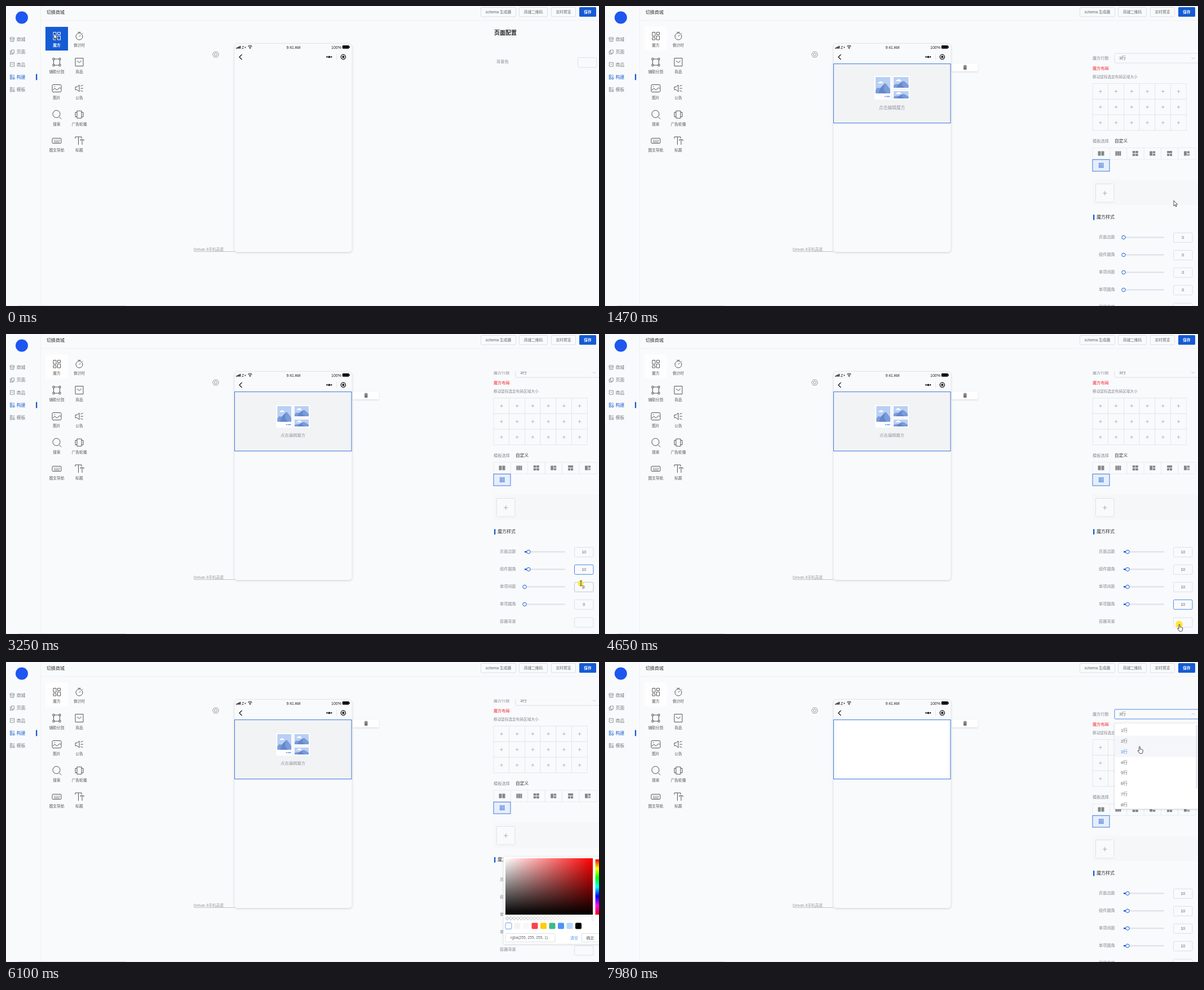
An HTML page that plays this animation: 1052x532 px, repeating every 8000 ms.

```html
<!DOCTYPE html>
<html>
<head>
<meta charset="utf-8">
<style>
html, body { margin: 0; width: 100%; height: 100%; overflow: hidden; background: #f9fafc; }
svg { display: block; width: 100vw; height: 100vh; }
text { font-family: "Liberation Sans", "Noto Sans CJK SC", "Noto Sans CJK", sans-serif; white-space: pre; }
</style>
</head>
<body>
<svg viewBox="0 0 1052 532" preserveAspectRatio="none">
  <defs>
    <clipPath id="scroller"><path d="M855 66.500H1052V532H855z"/></clipPath>
    <linearGradient id="sat"><stop stop-color="#fff"/><stop offset="1" stop-color="#f00"/></linearGradient>
    <linearGradient id="val" x2="0" y2="1"><stop stop-opacity="0"/><stop offset="1"/></linearGradient>
    <linearGradient id="hue" x2="0" y2="1" data-stops></linearGradient>
    <linearGradient id="alpha"><stop stop-color="#fff" stop-opacity="0"/><stop offset="1" stop-color="#fff"/></linearGradient>
    <pattern id="checker" width="6" height="6" patternUnits="userSpaceOnUse">
      <path d="M0 0h3v3H0zM3 3h3v3H3z" fill="#ccc"/>
    </pattern>
    <filter id="shadow" x="-20%" y="-20%" width="140%" height="140%">
      <feDropShadow dx="0" dy="1" stdDeviation="1.500" flood-opacity=".14"/>
    </filter>
  </defs>
  <g id="base"></g>
  <g id="live"></g>
</svg>
<script>
const LOOP = 8000, BLUE = '#155bd4', BG = '#f9fafc', LINE = '#dcdfe6', GREY = '#85888f', INK = '#606266';
const $ = id => document.getElementById(id);

// Drawing helpers; text is placed by its vertical centre.
const text = (x, y, s, size = 7.2, fill = GREY, anchor = 'start', more = '') =>
  `<text x="${x}" y="${y + size * .37}" font-size="${size}" fill="${fill}" text-anchor="${anchor}" ${more}>${s}</text>`;
const mid = (x, y, s, size, fill, more) => text(x, y, s, size, fill, 'middle', more);
const rect = (x, y, w, h, fill, stroke = 'none', r = 0, more = '') =>
  `<rect x="${x}" y="${y}" width="${w}" height="${h}" rx="${r}" fill="${fill}" stroke="${stroke}" ${more}/>`;
const path = (d, stroke = '#555', fill = 'none', width = 1, more = '') =>
  `<path d="${d}" stroke="${stroke}" fill="${fill}" stroke-width="${width}" ${more}/>`;
const circle = (x, y, r, fill, stroke = 'none', width = 1) =>
  `<circle cx="${x}" cy="${y}" r="${r}" fill="${fill}" stroke="${stroke}" stroke-width="${width}"/>`;
const group = (x, y, body, more = '') => `<g transform="translate(${x} ${y})" ${more}>${body}</g>`;
const range = n => [...Array(n).keys()];

const clamp = v => Math.max(0, Math.min(1, v));
const smooth = p => p * p * (3 - 2 * p);
const out = p => 1 - (1 - p) ** 3;
const ramp = (t, from, ms) => clamp((t - from) / ms);

// Eased position along [time, x, y] keys.
function along(keys, t) {
  let i = keys.findIndex(k => k[0] > t);
  if (i < 0) return keys[keys.length - 1].slice(1);
  if (i === 0) return keys[0].slice(1);
  const [a, b] = [keys[i - 1], keys[i]], p = smooth((t - a[0]) / (b[0] - a[0]));
  return [a[1] + (b[1] - a[1]) * p, a[2] + (b[2] - a[2]) * p];
}

const tiles = [
  ['魔方', 'M-6-6.500h5v7h-5zM-6 3h5v4h-5zM1.500-6.500h5v4h-5zM1.500 0h5v7h-5z'],
  ['倒计时', 'M-6 1a6 6 0 1 0 12 0a6 6 0 1 0-12 0M-2.500-6.500h5M0 1l2.500-2.500M5-5l1 1'],
  ['辅助分割', 'M-4-5.500H4M-4 5.500H4M-5.500-4V4M5.500-4V4M-7-7h3v3h-3zM4-7h3v3h-3zM-7 4h3v3h-3zM4 4h3v3h-3z'],
  ['商品', 'M-7-7H7V7H-7zM-3.500-2.500Q0 4 3.500-2.500'],
  ['图片', 'M-6-6.500H6q2 0 2 2v9q0 2-2 2H-6q-2 0-2-2v-9q0-2 2-2zM-7 3l4-3 3 3 5-4 2 1M-4.500-3h1.500'],
  ['公告', 'M-7-2.500h3l4-3.500v12l-4-3.500h-3zM2.500 0h4.500M2.500-4l4-1.500M2.500 4l4 1.500'],
  ['搜索', 'M-7-1a6.500 6.500 0 1 0 13 0a6.500 6.500 0 1 0-13 0M4 4l4 4'],
  ['广告轮播', 'M-4-6.500H4V6.500H-4zM-4-4H-7V4h3M4-4h3V4H4'],
  ['图文导航', 'M-6-4.500H6q2 0 2 1.500v6q0 1.500-2 1.500H-6q-2 0-2-1.500v-6q0-1.500 2-1.500zM-5-1h2M-2-1h2M1-1h2M4-1h2M-5 2h10'],
  ['标题', 'M-7-4v-3H4v3M-1.500-7V7M2 0v-2h6v2M5-2v9'],
];

function tile(i, x, y, active) {
  const [name, d] = tiles[i], ink = active ? '#fff' : '#555';
  return (active ? rect(-20, -16, 40, 42, BLUE) : '') && group(x, y, rect(-20, -16, 40, 42, BLUE) +
    path(d, ink) + mid(0, 17, name, 6.7, ink, 'font-weight="600"')) ||
    group(x, y, path(d, ink) + mid(0, 17, name, 6.7, '#555'));
}

function sidebar() {
  const gridIcon = 'M-3.500-3.500h3v3h-3zM-3.500 1h3v3h-3zM1.500-3h2.500M1.500-.5h2.500M1.500 1.500h2.500v2.500h-2.500z';
  const items = [
    ['商城', 'M-3.500-3.500h7l.5 2.500h-8zM-3-1v4.500h6v-4.500M-1 1.500h2'],
    ['页面', 'M-1.500-3.500h5v5.500h-5zM-1.500-1.500h-2v5.500h5v-2'],
    ['商品', 'M-3.500-3.500h7v7h-7zM-1.500-1q1.500 2.500 3 0'],
    ['构建', gridIcon], ['模板', gridIcon],
  ];
  return circle(28, 20.500, 11, '#1e56f0') + items.map(([name, d], i) => {
    const y = 59.300 + i * 22.150, ink = i === 3 ? BLUE : '#777a80';
    return group(11, y, path(d, ink, 'none', .8)) + text(18.700, y, name, 7.900, ink);
  }).join('') + rect(53, 120.500, 2.300, 11, BLUE, 'none', 1);
}

function header() {
  const button = (x, w, s) => rect(x + .5, 2.500, w - 1, 16.500, BG, LINE, 1.500) + mid(x + w / 2, 10.500, s, 6.700, INK);
  return text(72, 11, '切换商城', 8, '#333') + button(842, 63, 'schema 生成器') + button(910, 51, '商城二维码') +
    button(967, 44, '实时预览') + rect(1017, 2, 30, 17, BLUE, 'none', 1.500) +
    mid(1032, 10.500, '保存', 6.700, '#fff', 'font-weight="700"');
}

function phone() {
  return rect(405, 66.500, 209, 370, BG, '#e6e7ea', 6, 'filter="url(#shadow)"') +
    range(4).map(i => rect(408 + i * 2.200, 74 - i * 1.100, 1.600, 1.500 + i * 1.100, '#111')).join('') +
    text(418, 73, 'Z+', 7, '#222') +
    path('M429.500 71.500q3.500-3 7 0M431 73.300q2-1.600 4 0', '#111', 'none', 1.200) + circle(433, 75, .9, '#111') +
    mid(510, 73, '9:41 AM', 6.800, '#222') + text(577, 73, '100%', 7, '#222') +
    rect(597, 70, 11.500, 5.500, '#111', '#111', 1.200, 'stroke-width=".5"') + rect(609, 71.500, 1, 2.500, '#111') +
    path('M418.500 86l-4.500 4.500 4.500 4.500', '#111', 'none', 1.200) +
    circle(569.500, 90.300, 1.200, '#111') + circle(573.300, 90.300, 1.900, '#111') + circle(577.100, 90.300, 1.200, '#111') +
    path('M586.500 85v11', '#e4e5e8') + circle(598.300, 90.300, 4.100, 'none', '#111', 1.300) + circle(598.300, 90.300, 2, '#111') +
    group(372, 86, path('M-5.500 0l2.700-4.700h5.600l2.700 4.700-2.700 4.700h-5.600z', '#999') + circle(0, 0, 2.400, 'none', '#999')) +
    text(333, 431.700, 'Dolvan 8手机高度', 6.700, '#999') + path('M333 435.500H405', '#c4c5c8');
}

$('base').innerHTML = rect(0, 0, 1052, 532, BG) + path('M61.500 0V532M61.500 25.500H1052', '#f0f1f4') +
  path('M0 531.500H1052', '#eceded') + path('M22 531.500H212', '#d4d4d6') + sidebar() + header() + phone() +
  tiles.slice(1).map((_, i) => tile(i + 1, i % 2 ? 90 : 130, 53 + (i + 1 >> 1) * 46.500)).join('');
document.querySelector('[data-stops]').innerHTML =
  range(7).map(i => `<stop offset="${i / 6}" stop-color="hsl(${i * 60} 100% 50%)"/>`).join('');

// Placeholder pictures inside the dropped component.
function scene(x, y, w, h) {
  return rect(x - 2, y - 2, w + 4, h + 4, '#fff') + rect(x, y, w, h, '#b9cff4') + group(x, y,
    path(`M0 ${h * .8}Q${w * .15} ${h * .55} ${w * .3} ${h * .7}L${w * .62} ${h * .4}Q${w * .7} ${h * .35} ${w * .78} ${h * .48}L${w} ${h * .75}V${h}H0z`, 'none', '#7b9cda') +
    path(`M${w * .3} ${h * .7}L${w * .62} ${h * .4}L${w * .55} ${h * .75}L${w * .75} ${h}H${w * .2}z`, 'none', '#6588cb') +
    path(`M${w * .15} ${h * .38}q1-3 3.500-2.500q2-2.500 4 .5q2 0 2 2z`, 'none', '#fff'));
}

function component(t) {
  if (t < 780) return '';
  const white = t >= 6790, k = t >= 2720 ? .952 : 1;
  const art = rect(478, 124, 30, 42, '#fff') + scene(480, 126, 26, 29) + rect(496, 159.500, 2, 2, '#5b8be0', 'none', 1) +
    rect(499, 159.500, 6.500, 2, '#7ba4ee') + scene(512, 126, 26.500, 19) + scene(512, 151, 26.500, 13) +
    mid(509, 180.500, '点击编辑魔方', 7.750, '#96989d');
  return rect(405.500, 102.500, 207.500, 105, white ? BG : '#f2f3f5', t >= 1010 ? '#3f78dc' : 'none') +
    (white ? rect(411, 103.500, 197, 103, '#fff')
      : `<g transform="translate(509 165) scale(${k}) translate(-509 -165)">${art}</g>`) +
    rect(615.500, 102, 46, 14, '#fff', 'none', 1, 'filter="url(#shadow)"') +
    path('M635.500 106.500h6.500M637.500 106v-1h2.500v1', '#777') + rect(636, 107.300, 5.500, 5.700, '#777', 'none', .7);
}

// Number rows: caret set, digit typed, value committed.
const rows = [
  ['页面边距', 2110, 2260, 2720], ['组件圆角', 2720, 2870, 3230],
  ['单项间距', 3240, 3580, 3900], ['单项圆角', 3920, 4060, 4620],
];

function numberRow([name, focus, key, commit], i, t) {
  const y = 410.300 + i * 31, x = t >= commit ? 927 : 920;
  const lit = t >= focus + 110 && t < commit + 110, typing = t >= focus && t < commit;
  return text(876, y - .8, name) + rect(920, y - 1.200, 72, 2.400, '#e1e4ec', 'none', 1.200) +
    rect(920, y - 1.200, x - 920, 2.400, BLUE) + circle(x, y, 3.200, '#fff', BLUE) +
    rect(1008.500, y - 8, 33.500, 17, BG, lit ? '#4d86e6' : typing ? '#c0c4cc' : LINE, 2) +
    mid(1025.300, y + .5, t >= key ? '10' : '0', 7, INK) +
    (typing ? path(`M1023.500 ${y - 3}v7`, '#333', 'none', .6) : '');
}

const templates = [
  'M-5.500-4h5v8h-5zM.5-4h5v8h-5z',
  'M-5-4h3v8h-3zM-1.500-4h3v8h-3zM2-4h3v8h-3z',
  'M-5-4.500h4.600v4h-4.600zM.4-4.500h4.600v4h-4.600zM-5 .5h4.600v4h-4.600zM.4 .5h4.600v4h-4.600z',
  'M-5-4h5v8h-5zM.8-4h4.200v3.600h-4.200zM.8 .4h4.200v3.600h-4.200z',
  'M-4.500-4.500h9v4h-9zM-4.500 .5h4.100v4h-4.100zM.4 .5h4.100v4h-4.100z',
  'M-5-4h5v8h-5zM.8-4h4.200v3.600h-4.200zM.8 .4h1.700v3.600h-1.700zM3.300 .4h1.700v3.600h-1.700z',
];

function panel(t) {
  if (t < 1010) return mid(886, 47.500, '页面配置', 10, '#222', 'font-weight="600"') +
    text(870, 98.500, '背景色') + rect(1014.500, 91.500, 33, 17.500, BG, LINE, 2);
  const scroll = 24 * (smooth(ramp(t, 1700, 150)) - smooth(ramp(t, 7020, 150)));
  const open = t >= 7500;
  let s = text(865, 92.500, '魔方行数') + rect(904, 84, 160, 17, BG, open ? '#4d86e6' : LINE, 1.500) +
    text(912, 92.500, '3行', 7.700, INK) +
    path(open ? 'M1040.500 94l3-3 3 3' : 'M1040.500 91l3 3 3-3', '#b4b8c0', 'none', .8) +
    text(865, 110.300, '魔方布局', 7.200, '#f5222d') + text(865, 125.500, '移动鼠标选定布局区域大小', 6.650);
  for (let i = 0; i < 18; i++) {
    const x = 865 + i % 6 * 27.700, y = 137.500 + (i / 6 | 0) * 27.700;
    s += rect(x, y, 27.700, 27.700, BG, '#e1e3e8', 0, 'stroke-width=".8"') +
      path(`M${x + 11.300} ${y + 14}h5.400M${x + 14} ${y + 11.300}v5.400`, '#a5a7ac', 'none', .8);
  }
  s += text(865, 239, '模板选择') + text(904, 239, '自定义', 7.700, '#333');
  templates.forEach((d, i) => {
    s += rect(865 + i * 30.400, 251.300, 30.400, 20.700, BG, '#e6e8ed', 0, 'stroke-width=".8"') +
      group(880 + i * 30.400, 261.500, path(d, 'none', '#85878b'));
  });
  s += rect(865, 272.300, 30, 20.700, '#e6eefb', '#3f78dc') + range(16).map(i =>
    rect(876 + i % 4 * 2.300, 278.500 + (i >> 2) * 2.300, 1.500, 1.500, BLUE)).join('') +
    rect(865, 308.500, 187, 44.500, '#f6f7f9') +
    rect(870.500, 315.500, 32.500, 32.500, BG, '#c4c7ce', 2, 'stroke-dasharray="2 1.500" stroke-width=".8"') +
    path('M883 332h7.500M886.700 328.200v7.500', '#999', 'none', .8) +
    rect(866, 370, 2.300, 9.500, BLUE) + text(872, 374.500, '魔方样式', 8, '#333') +
    rows.map((r, i) => numberRow(r, i, t)).join('') +
    text(876, 533.500, '容器背景') + rect(1008.500, 527, 33.500, 17, BG, LINE, 2);
  return `<g clip-path="url(#scroller)">${group(0, -scroll, s)}</g>`;
}

function unfold(k, y, body) {
  return k < .01 ? '' : `<g opacity="${k}" transform="translate(0 ${y}) scale(1 ${k}) translate(0 ${-y})">${body}</g>`;
}

function picker(t) {
  const k = t < 6800 ? out(ramp(t, 4790, 200)) : (1 - ramp(t, 6800, 200)) ** 3, chosen = t >= 5710;
  const swatches = ['#fff', '#f3f3f3', '#f8f8f8', '#f5444c', '#ffcd00', '#3dba86', '#4e92fb', '#b6d8fd', '#000'];
  return unfold(k, 500, rect(882.500, 345, 180, 155, '#fff', '#eceef2', 2, 'filter="url(#shadow)"') +
    rect(886, 348, 155, 100, 'url(#sat)') + rect(886, 348, 155, 100, 'url(#val)') + rect(1045.500, 350, 8, 98, 'url(#hue)') +
    rect(886, 451.500, 155, 6.500, 'url(#checker)') + rect(886, 451.500, 155, 6.500, 'url(#alpha)') +
    rect(1039.500, 450.500, 2.500, 8, '#fff', '#ddd', .5, 'stroke-width=".7"') +
    swatches.map((c, i) => rect(886 + i * 15.500, 462.500, 11, 11, c, i || !chosen ? 'none' : '#6b9cf5', 2)).join('') +
    rect(886, 481.500, 88, 15, '#fff', LINE, 1.500) + (chosen ? text(895, 489, 'rgba(255, 255, 255, 1)', 6.700, INK) : '') +
    mid(1008, 489, '清空', 6.900, '#4e8df5') + rect(1021.500, 481.500, 40, 15, '#fff', LINE, 1.500) + mid(1036.500, 489, '确定', 6.900, INK));
}

function dropdown(t, cursorY) {
  return unfold(out(ramp(t, 7500, 250)), 108,
    rect(904, 108.500, 160, 152, '#fff', '#e6e8ed', 2, 'filter="url(#shadow)"') +
    path('M923 108.500l3.500-3.500 3.500 3.500', '#e6e8ed', '#fff') + range(8).map(i => {
      const y = 121.300 + i * 18.800;
      return (Math.abs(cursorY - y) < 9.500 ? rect(904.500, y - 9.400, 150, 18.800, '#f5f6f9') : '') +
        text(915, y, `${i + 1}行`, 7.700, i === 2 ? '#3f86f5' : INK);
    }).join('') + rect(1048, 111, 3, 114, '#e6e7ea', 'none', 1.500));
}

const cursorKeys = [
  [230, 85, 49], [780, 485, 149], [1240, 485, 149], [1470, 1009, 345], [1850, 1009, 345], [2020, 1021, 388],
  [2380, 1021, 388], [2530, 1021, 418], [3030, 1021, 418], [3200, 1020, 442], [3680, 1020, 442], [3850, 1020, 479],
  [4230, 1020, 479], [4480, 1019, 514.500], [4900, 1019, 514.500], [5190, 908, 470], [5250, 908, 470], [5560, 895, 467],
  [5780, 895, 467], [6050, 1062, 492], [6740, 1062, 492], [6880, 1017, 436], [7180, 1017, 436], [7430, 945, 92],
  [7650, 945, 92], [7960, 948.500, 149.500],
];
const clicks = [2110, 2720, 3240, 3920, 4620, 5710, 6750, 7500];
const arrow = 'M0 0v9.500l2.200-2 1.500 3.400 1.400-.6-1.500-3.300h3z';
const hand = 'M-.9 .8q.9-1.200 1.800 0v4l4 1q1 .4 .9 1.500l-.6 4q-.3 1.400-1.500 1.400h-3.500l-3.300-4.300q-.4-1.300 .9-1.200l1.300 1z';
const beam = 'M-1.700-4.300h3.400M0-4.300v8.600M-1.700 4.300h3.400';

function pointer(t, x, y) {
  const onHand = t > 4400 && t < 6100 || t > 7350;
  const onField = t > 1980 && t <= 4400;
  return group(x, y, (clicks.some(c => t >= c && t < c + 120) ? circle(-.5, .5, onField ? 5 : 6.500, '#ffe83a') : '') +
    (onField ? path(beam, '#333', 'none', .9) : path(onHand ? hand : arrow, '#222', '#fff', .8)));
}

function render(now) {
  const t = now % LOOP, [x, y] = along(cursorKeys, t), dragging = t >= 230 && t < 780;
  $('live').innerHTML = (t < 310 ? '' : rect(70, 37, 40, 42, '#fefefe')) + tile(0, 90, 53, t < 310) +
    component(t) + panel(t) + picker(t) + dropdown(t, y) +
    (dragging ? `<g opacity=".7">${tile(0, x + 5, y + 4, true)}</g>` : '') + pointer(t, x, y);
  requestAnimationFrame(render);
}
requestAnimationFrame(render);
</script>
</body>
</html>
```
